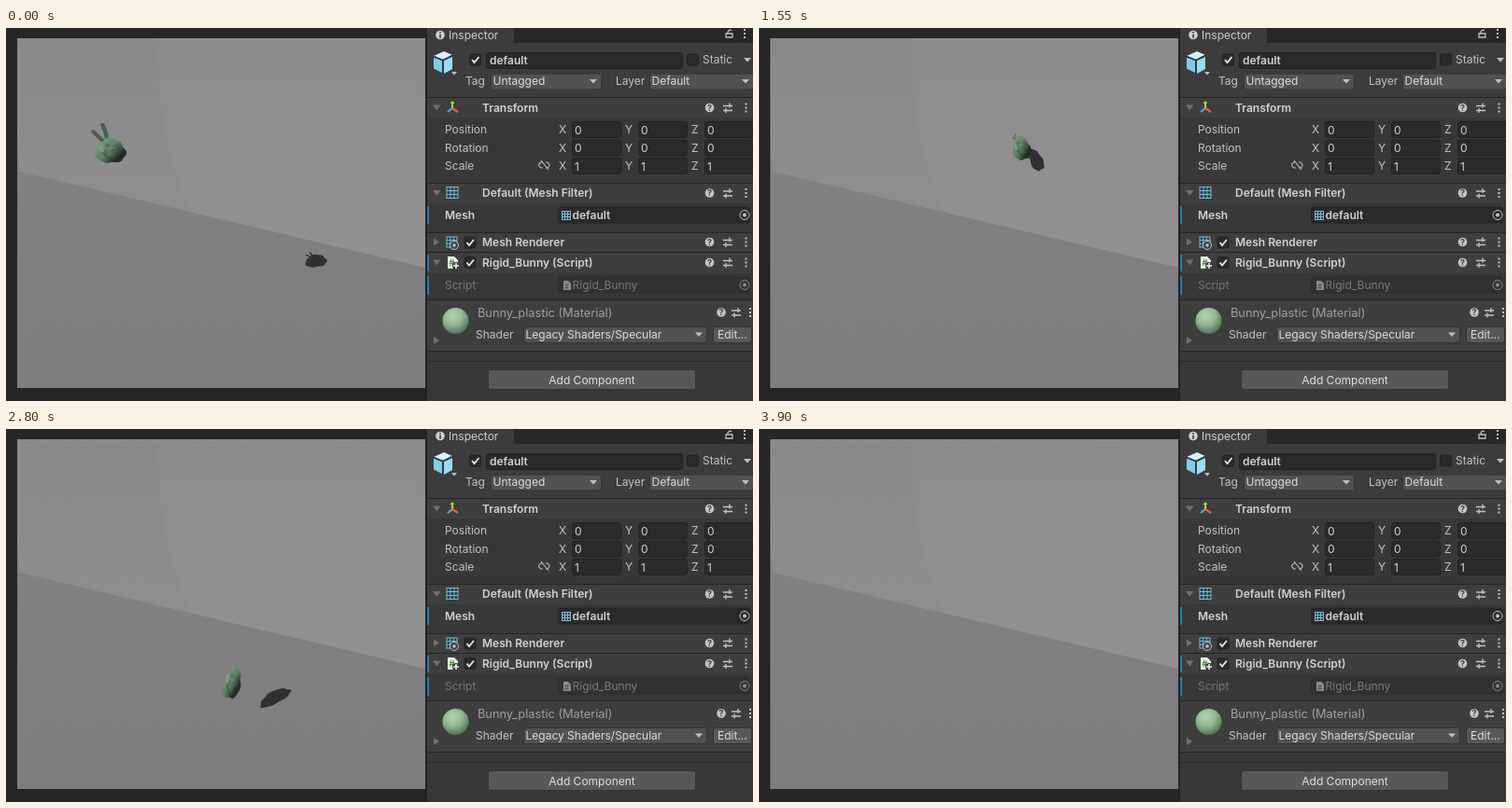
An HTML page that plays this animation: 800 by 400 pixels, repeating every 6.2 s.

```html
<!DOCTYPE html>
<html lang="en">
<head>
<meta charset="utf-8">
<title>Tumbling bunny</title>
<style>
html, body { margin: 0; width: 100%; height: 100%; overflow: hidden; background: #262626; }
svg { display: block; font: 12px Inter, "Open Sans", sans-serif; }
text { white-space: pre; }
</style>
</head>
<body>
<svg id="stage" width="800" height="400" viewBox="0 0 800 400">
  <defs>
    <clipPath id="view"><rect x="12" y="11" width="437" height="375"/></clipPath>
    <linearGradient id="wall" x2="0" y2="1"><stop stop-color="#8c8c8c"/><stop offset=".6" stop-color="#919191"/></linearGradient>
    <linearGradient id="side" x2="0" y2="1"><stop stop-color="#898989"/><stop offset="1" stop-color="#8e8e8e"/></linearGradient>
    <linearGradient id="floor" x2="0" y2="1"><stop stop-color="#828082"/><stop offset="1" stop-color="#7f7d80"/></linearGradient>
    <linearGradient id="fur" gradientUnits="userSpaceOnUse" x1="-8" y1="-7" x2="8" y2="7">
      <stop stop-color="#78997c"/><stop offset=".45" stop-color="#5f7f65"/><stop offset=".65" stop-color="#435c49"/><stop offset=".8" stop-color="#232d26"/>
    </linearGradient>
    <radialGradient id="ball" cx=".4" cy=".3" r=".75"><stop stop-color="#b4d4b1"/><stop offset=".5" stop-color="#93b592"/><stop offset="1" stop-color="#4f674f"/></radialGradient>
  </defs>
  <g clip-path="url(#view)">
    <rect x="12" y="11" width="437" height="375" fill="url(#wall)"/>
    <path d="M12 11H163Q160 110 198 198L12 154Z" fill="url(#side)"/>
    <path d="M12 122L15 154L12 153Z" fill="#838383"/>
    <path d="M12 153.300L15 154L449 257V386H12Z" fill="url(#floor)"/>
    <g id="actors"><g id="shadow" fill="#302f31" stroke="#302f31"></g><g id="bunny" fill="url(#fur)" stroke="#47604c"></g></g>
  </g>
  <g id="panel"></g>
</svg>
<script>
const $ = id => document.getElementById(id);

// ---- inspector panel ----
let out = '';
const rect = (x, y, w, h, fill, extra = '') =>
  out += `<rect x="${x}" y="${y}" width="${w}" height="${h}" fill="${fill}" ${extra}/>`;
const path = (d, stroke, width = 1, fill = 'none') =>
  out += `<path d="${d}" stroke="${stroke}" stroke-width="${width}" fill="${fill}"/>`;
const disc = (x, y, r, fill, extra = '') => out += `<circle cx="${x}" cy="${y}" r="${r}" fill="${fill}" ${extra}/>`;
const text = (x, y, s, fill = '#c4c4c4', extra = '') =>
  out += `<text x="${x}" y="${y + 4.3}" fill="${fill}" ${extra}>${s}</text>`;
const bold = (x, y, s) => text(x, y, s, '#d2d2d2', 'font-weight="600"');
const field = (x, y, w, h = 18, fill = '#2a2a2a', edge = '#222') =>
  rect(x + .5, y + .5, w - 1, h - 1, fill, `rx="2.500" stroke="${edge}"`);
const arrow = (x, y) => path(`M${x - 4} ${y - 2}h8l-4 4.500Z`, 'none', 0, '#c0c0c0');
const dots = (x, y) => [-4, 0, 4].forEach(d => rect(x - 1, y + d - 1, 2, 2, '#c4c4c4'));
const drop = (x, y, w, s) => {
  field(x, y, w, 18, '#515151', '#343434');
  text(x + 2.5, y + 8.5, s, '#dedede');
  arrow(x + w - 9, y + 8.5);
};
const check = (x, y, on) => {
  field(x, y, 13, 13);
  if (on) path(`M${x + 3} ${y + 6.5}l2.500 3l5-6`, '#e8e8e8', 1.8);
};
const fold = (y, open, x = 461) =>
  path(open ? `M${x - 4} ${y - 3}h8.500l-4.200 6Z` : `M${x - 3} ${y - 4}v8l6-4Z`, 'none', 0, '#707070');
const tools = (y, xs = [753.5, 773, 792.5]) => {
  const [a, b, c] = xs;
  disc(a, y, 4.8, '#c4c4c4');
  out += `<text x="${a}" y="${y + 3.3}" font-size="9" font-weight="700" text-anchor="middle" fill="#3e3e3e">?</text>`;
  path(`M${b - 5} ${y - 2}h10M${b - 5} ${y + 3}h10M${b + 2} ${y - 5}v5M${b - 2} ${y + .5}v5`, '#c4c4c4', 1.3);
  dots(c, y);
};
const bar = (y, h) => { rect(451, y, 349, h, '#3e3e3e'); rect(451, y - 1, 349, 1, '#242424'); };
const grid = (x, y, n) => {
  rect(x, y, n, n, '#23414c', 'stroke="#7fb9cf"');
  for (const k of [n / 3, 2 * n / 3]) path(`M${x + k} ${y}v${n}M${x} ${y + k}h${n}`, '#7fb9cf');
};

rect(451, 0, 349, 400, '#383838');
rect(451, 0, 349, 16, '#282828');
rect(451, 0, 93, 16, '#3c3c3c');
disc(465, 7.5, 4.8, '#d0d0d0');
path('M465 4v1.500M465 6.700v4', '#383838', 1.6);
text(474, 7.5, 'Inspector', '#d0d0d0');
path('M771 6h7v4h-7ZM773 6v-2q2-3 4-1', '#c0c0c0', 1.3);
dots(791, 6);

rect(451, 16, 349, 58, '#3c3c3c');
path('M458 30l11-5l9 4l-10 5Z', 'none', 0, '#d5f2fc');
path('M458 31.500l9 3.500v13l-9-4.500Z', 'none', 0, '#7fcdeb');
path('M469 35l9-4v13l-9 5Z', 'none', 0, '#9bdcf4');
path('M458 30.500l10 4v14M468 34.500l10-5', '#2f3b40', 1.5);
path('M477 47h6l-3 3.500Z', 'none', 0, '#c0c0c0');
check(496, 27.5, true);
field(514, 26, 211);
bold(518, 34.5, 'default');
check(729, 27.5);
text(746, 34, 'Static');
arrow(794, 34);
text(492, 57, 'Tag');
drop(519, 48.5, 119, 'Untagged');
text(653, 57, 'Layer');
drop(689, 48.5, 112, 'Default');

bar(75, 21);
fold(85.5, true);
path('M478 86V79', '#b5d545', 2);
path('M478 86l-5 4', '#57a7e8', 2.2);
path('M478 86l6 4', '#e2603e', 2.2);
path('M475.500 81l2.500-3l2.500 3Z', 'none', 0, '#b5d545');
bold(510, 85.5, 'Transform');
tools(85.5);
['Position', 'Rotation', 'Scale'].forEach((name, i) => {
  const y = 109 + i * 19.5;
  text(470, y, name);
  ['X', 'Y', 'Z'].forEach((axis, k) => {
    const x = 606 + k * 71;
    text(x - 14, y, axis);
    field(x, y - 9, 53);
    text(x + 3, y + .5, i < 2 ? '0' : '1', '#d4d4d4');
  });
});
path('M575 144h-2q-5 3 0 6h2M578 144h2q4 3 0 6h-2M573 142l8 10', '#b8b8b8', 1.2);

bar(167, 21);
fold(177, true);
grid(472, 170.5, 12);
bold(510, 177, 'Default (Mesh Filter)');
tools(177);
bold(470, 200.5, 'Mesh');
field(591, 191.5, 206);
grid(595.5, 196.5, 9);
bold(606.5, 201, 'default');

bar(220, 21);
fold(229.5, false);
grid(472, 224, 11);
disc(480, 233, 4.5, '#3e3e3e', 'stroke="#c4c4c4"');
disc(480, 233, 1.8, '#c4c4c4');
check(490.5, 223.5, true);
bold(510, 229.5, 'Mesh Renderer');
tools(229.5);

bar(241, 22);
fold(251.5, true);
path('M473 245h7l4 4v9h-11Z', 'none', 0, '#eee');
text(474.5, 251, '#', '#4a8a3c', 'font-size="9" font-weight="700"');
disc(482, 255, 4, '#3e3e3e');
path('M482 252v6M479 255h6', '#eee', 1.6);
check(490.5, 245, true);
bold(510, 251.5, 'Rigid_Bunny (Script)');
tools(251.5);
text(470, 275.5, 'Script', '#757575');
field(591, 266.5, 206, 18, '#313131', '#2c2c2c');
path('M597 271h5l3 3v7h-8Z', 'none', 0, '#8c8c8c');
text(598, 276, '#', '#444', 'font-size="8"');
text(606.5, 276, 'Rigid_Bunny', '#7a7a7a');
for (const [y, fill] of [[200.5, '#c4c4c4'], [275.5, '#8c8c8c']]) {
  disc(791, y, 5, 'none', `stroke="${fill}"`);
  disc(791, y, 2, fill);
}
for (const [y, h] of [[191, 19], [243, 18], [266, 20]]) rect(451, y, 2, h, '#1c7fae');

bar(292, 54);
disc(481.5, 314, 14, 'url(#ball)');
fold(335, false);
text(505, 305.5, 'Bunny_plastic (Material)', '#a0a0a0', 'font-size="12.800"');
tools(305, [766, 782, 797]);
text(503, 328.5, 'Shader');
drop(554, 320, 197, 'Legacy Shaders/Specular');
field(757, 320, 42, 18, '#585858', '#343434');
text(762, 328.5, 'Edit...', '#dedede');
rect(451, 346, 349, 1, '#242424');
rect(451, 357, 349, 1, '#2a2a2a');
field(516, 366, 223, 22, '#585858', '#343434');
text(627.5, 377.5, 'Add Component', '#e0e0e0', 'text-anchor="middle"');
rect(449, 0, 2, 400, '#222');
$('panel').innerHTML = out;

// ---- bunny ----
let seed = 7;
const rnd = () => (seed = seed * 16807 % 2147483647) / 2147483647;
const outline = Array.from({ length: 30 }, (_, i) => {
  const a = i * Math.PI / 15, r = 9.5 + .7 * Math.sin(3 * a) + .5 * Math.sin(7 * a + 1);
  return `${(r * Math.cos(a)).toFixed(1)} ${(r * Math.sin(a)).toFixed(1)}`;
}).join('L');
const shape = `<path class="ears" d="M-3-6Q-6-9-11-15M-2-6Q-2-12-5-20" fill="none" stroke-width="2.600" stroke-linecap="round"/>
  <path d="M${outline}Z" stroke="none"/>`;
let lumps = '';
for (let i = 0; i < 26; i++) {
  const a = rnd() * 6.28, r = 7.5 * Math.sqrt(rnd()), x = r * Math.cos(a), y = r * Math.sin(a);
  lumps += `<circle cx="${x}" cy="${y}" r="${.7 + rnd()}" stroke="none" opacity=".25" fill="${i % 2 && x + y < 2 ? '#93b097' : '#2c3d30'}"/>`;
}
$('shadow').innerHTML = shape;
$('bunny').innerHTML = shape + lumps;

// time, bunny x y, shadow x y
const track = [
  [550, 112, 132, 332, 250], [700, 147, 93, 346, 222], [900, 187, 67, 337, 174],
  [1150, 234, 61, 326, 134], [1350, 262, 82, 311, 120], [1550, 281, 129, 297, 142],
  [1800, 283, 193, 303, 214], [1900, 279, 210, 309, 229], [2000, 275, 210, 314, 233],
  [2450, 258, 237, 304, 246], [2800, 242, 273, 288, 288], [3100, 208, 340, 252, 350],
  [3500, 156, 369, 190, 376], [3800, 130, 384, 164, 388]];
// time, bunny half width, half height, angle, ear size, then the same for the shadow
const poses = [
  [550, 17, 14, 0, 1, 12, 7, -8, .6], [900, 16, 13, 8, .5, 8, 14, -26, .7],
  [1550, 10, 14, -12, .4, 7, 13, -24, .1], [2000, 8, 15, 8, .1, 15, 6, -14, .1],
  [2800, 10, 18, 15, .1, 19, 7, -28, .1], [3500, 12, 20, 55, .1, 25, 8, -22, .1]];

// smooth curve through the keys
function sample(keys, t) {
  const last = keys.length - 1;
  t = Math.max(keys[0][0], Math.min(keys[last][0], t));
  let i = 0;
  while (i < last - 1 && t >= keys[i + 1][0]) i++;
  const a = keys[i], b = keys[i + 1], p = keys[Math.max(0, i - 1)], n = keys[Math.min(last, i + 2)];
  const d = b[0] - a[0], u = (t - a[0]) / d, v = 1 - u;
  return a.slice(1).map((_, j) => {
    const k = j + 1, slope = (from, to) => (to[k] - from[k]) / (to[0] - from[0]) * d;
    return a[k] * v * v * (1 + 2 * u) + b[k] * u * u * (3 - 2 * u)
      + slope(p, b) * u * v * v - slope(a, n) * u * u * v;
  });
}

function place(id, x, y, w, h, turn, ear) {
  const g = $(id);
  g.setAttribute('transform', `translate(${x} ${y}) rotate(${turn}) scale(${w / 10} ${h / 10})`);
  g.querySelector('.ears').setAttribute('transform', `translate(-3 -6) scale(${Math.max(.05, ear)}) translate(3 6)`);
}

function draw(now) {
  const t = Math.floor(now % 6200 / 50) * 50;
  const [x, y, sx, sy] = sample(track, t);
  const pose = sample(poses, t);
  place('bunny', x, y, ...pose.slice(0, 4));
  place('shadow', sx, sy, ...pose.slice(4));
  $('fur').setAttribute('gradientTransform', `rotate(${-pose[2]})`);
  $('actors').setAttribute('visibility', t < 3900 ? 'visible' : 'hidden');
}
const start = performance.now();
(function loop() {
  draw(performance.now() - start);
  requestAnimationFrame(loop);
})();
</script>
</body>
</html>
```
